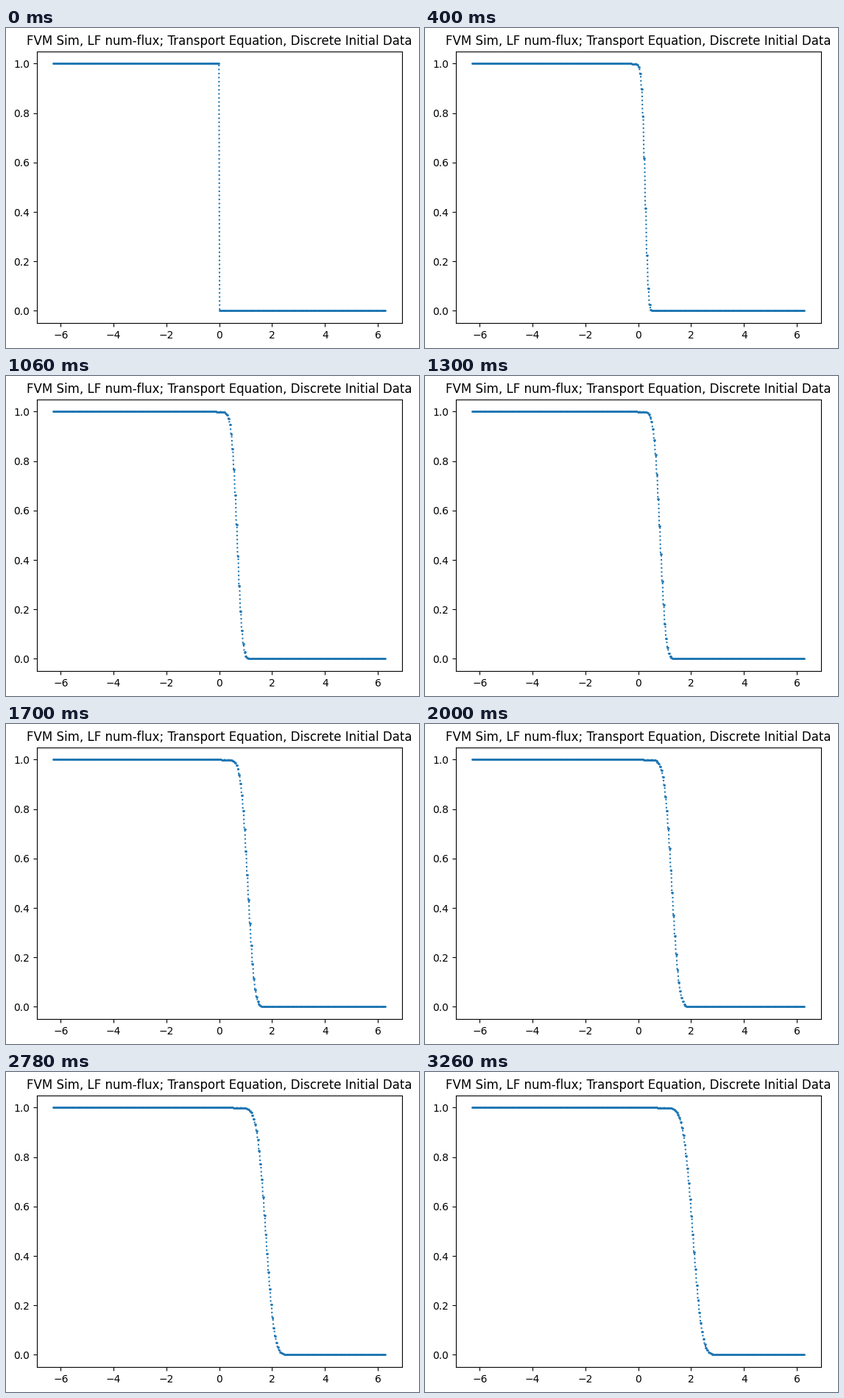
A matplotlib script for the animation above (3280 ms loop, 561 by 435 pixels).

```python
import numpy as np
import matplotlib.pyplot as plt
from matplotlib.animation import FuncAnimation

WIDTH, HEIGHT, DPI = 561, 435, 100
FRAMES, INTERVAL = 164, 20
CELLS, CFL = 500, 0.5

# Axes box in pixels: left, bottom, width, height
LEFT, BOTTOM, AX_W, AX_H = 41.72, 33.7, 496.0, 369.6


def inches(pixels):
    """Tiny surplus so that the pixel size is not truncated by one."""
    return (pixels + 0.001) / DPI


def lax_friedrichs(u):
    """One step of u_t + u_x = 0 with the Lax-Friedrichs flux."""
    new = u.copy()
    new[1:-1] = 0.5 * ((1 + CFL) * u[:-2] + (1 - CFL) * u[2:])
    return new


x = np.linspace(-2 * np.pi, 2 * np.pi, CELLS)
states = [np.where(x < 0, 1.0, 0.0)]
while len(states) < FRAMES:
    states.append(lax_friedrichs(states[-1]))

fig = plt.figure(figsize=(inches(WIDTH), inches(HEIGHT)), dpi=DPI, facecolor="white")
ax = fig.add_axes([LEFT / WIDTH, BOTTOM / HEIGHT, AX_W / WIDTH, AX_H / HEIGHT])
ax.set_title("FVM Sim, LF num-flux; Transport Equation, Discrete Initial Data")
(line,) = ax.plot(x, states[0], "o:", color="C0", linewidth=1.5, markersize=1)
ax.set_xlim(-2.2 * np.pi, 2.2 * np.pi)
ax.set_ylim(-0.05, 1.05)


def update(frame):
    line.set_ydata(states[frame])
    return (line,)


anim = FuncAnimation(fig, update, frames=FRAMES, interval=INTERVAL,
                     repeat=True, repeat_delay=0)
plt.show()
```
